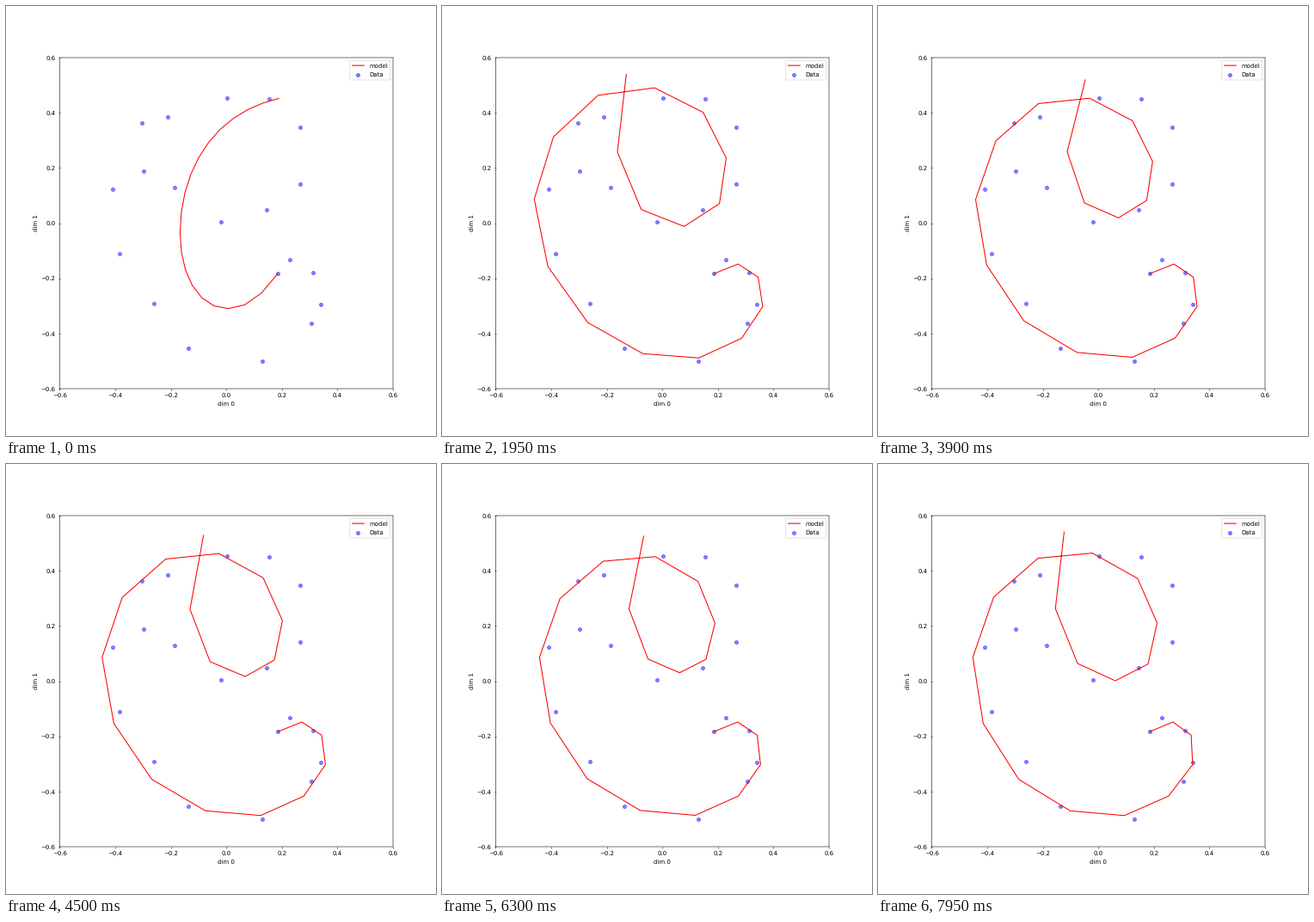
Animation, 500 px wide and 500 px high, one loop 8000 ms. Source, as a matplotlib script:

```python
import numpy as np
import matplotlib.pyplot as plt
from matplotlib.animation import FuncAnimation

# Unsnapped strokes and unhinted text sit at their true sub-pixel places
plt.rcParams.update({"path.snap": False, "text.hinting": "none"})

FRAMES, STEP = 160, 50
UNFOLD = 18                      # frames spent unrolling the first arc
I = np.arange(20)                # vertex numbers along the model line

DOTS = np.array([
    .185-.183j, .228-.131j, .312-.178j, .340-.296j, .307-.364j,
    .130-.499j, -.136-.455j, -.262-.291j, -.385-.112j, -.409+.124j,
    -.304+.362j, -.211+.384j, .002+.455j, .154+.450j, .266+.347j,
    .264+.143j, .146+.047j, -.018+.004j, -.187+.129j, -.298+.188j])


def smooth(keys):
    """Natural cubic spline through {vertex: point}, sampled at every vertex."""
    k, p = np.array(list(keys)), np.array(list(keys.values()))
    h = np.diff(k)
    d = np.diff(p) / h
    a, b = np.eye(len(k)), np.zeros(len(k), complex)
    for j in range(1, len(k) - 1):
        a[j, j - 1:j + 2] = h[j - 1], 2 * (h[j - 1] + h[j]), h[j]
        b[j] = 6 * (d[j] - d[j - 1])
    m = np.linalg.solve(a, b)
    j = np.clip(np.searchsorted(k, I, side="right") - 1, 0, len(h) - 1)
    u = I - k[j]
    return (p[j] + u * (d[j] - h[j] * (2 * m[j] + m[j + 1]) / 6)
            + u**2 * m[j] / 2 + u**3 * (m[j + 1] - m[j]) / (6 * h[j]))


def bump(center, width):
    return np.exp(-((I - center) / width) ** 2)


# Resting shapes in stage pixels, y pointing down
ARC = smooth({0: 316+311.3j, 1: 296.8+334j, 3: 258.5+351.8j, 7: 208.7+307j,
              11: 208+217.5j, 15: 249+143.5j, 18: 299+112.8j, 19: 317+107.5j})
SPIRAL = smooth({0: 316+311.3j, 1: 344+300j, 3: 371+349.5j, 5: 295.5+408.5j,
                 7: 169.5+366j, 9: 113.5+225j, 11: 186.5+113.5j,
                 13: 296+133.5j, 15: 312.5+226j, 17: 240+229j,
                 18: 220+169.5j, 19: 241+86j})

# Ways the spiral bends, along its direction and its outward normal
ALONG = np.gradient(SPIRAL)
ALONG /= np.abs(ALONG)
OUT = -1j * ALONG
MODES = np.array([OUT * bump(12.5, 4.5),          # swell of the upper turn
                  OUT * bump(15.5, 2),            # size of the inner loop
                  ALONG * bump(14.5, 3),          # slide along the inner loop
                  OUT * np.exp((I - 19) / 1.5),   # swing of the tip
                  bump(5, 2.7)])                  # sideways shift of the hook

REST = np.zeros(5)
TIGHT = np.array([3, -13, -12, 4, 11.5])
WIDE = np.array([12, 0, -2, 26, 3])
TALL = np.array([7, -6, 4, 24, 1.5])
SMALL = np.array([0, -5, 4, 7, -1])
LOW = np.array([4, 0, 5, 25, -9])
POSES = [(UNFOLD, TIGHT), (39, WIDE), (78, REST), (103, TALL), (126, SMALL),
         (FRAMES - 1, LOW)]
BREATH = .5 * WIDE               # swells twice between two poses


def polar(z):
    d = np.diff(z)
    return np.abs(d), np.unwrap(np.angle(d))


def unrolled(t):
    """Blend step lengths and headings from the arc to the tight spiral."""
    p = np.sin(np.pi / 2 * t)
    (r0, a0), (r1, a1) = polar(ARC), polar(SPIRAL + TIGHT @ MODES)
    stretch = 1 + 2.7 * p**2 * (1 - p) * bump(0, 6)[:-1]
    steps = (r0 + (r1 - r0) * p) * stretch * np.exp(1j * (a0 + (a1 - a0) * p))
    return ARC[0] + np.concatenate([[0], np.cumsum(steps)])


def curve(n):
    if n < UNFOLD:
        return unrolled(n / UNFOLD)
    for (n0, a), (n1, b) in zip(POSES, POSES[1:]):
        if n <= n1:
            t = (n - n0) / (n1 - n0)
            ease = (1 - np.cos(np.pi * t)) / 2
            bend = a + (b - a) * ease + BREATH * np.sin(2 * np.pi * t) ** 2
            return SPIRAL + bend @ MODES


fig, ax = plt.subplots(figsize=(10, 10), dpi=50)
line, = ax.plot([], [], "r", label="model")
ax.scatter(DOTS.real, DOTS.imag, c="b", alpha=.5, label="Data")
ax.set(xlim=(-.6, .6), ylim=(-.6, .6), xlabel="dim 0", ylabel="dim 1")
ax.legend(loc="upper right")


def draw(n):
    z = curve(n)
    line.set_data((z.real - 256.25) / 322.9, (252.5 - z.imag) / 320.8)
    return line,


anim = FuncAnimation(fig, draw, frames=FRAMES, interval=STEP, repeat=True,
                     repeat_delay=0)
plt.show()
```
